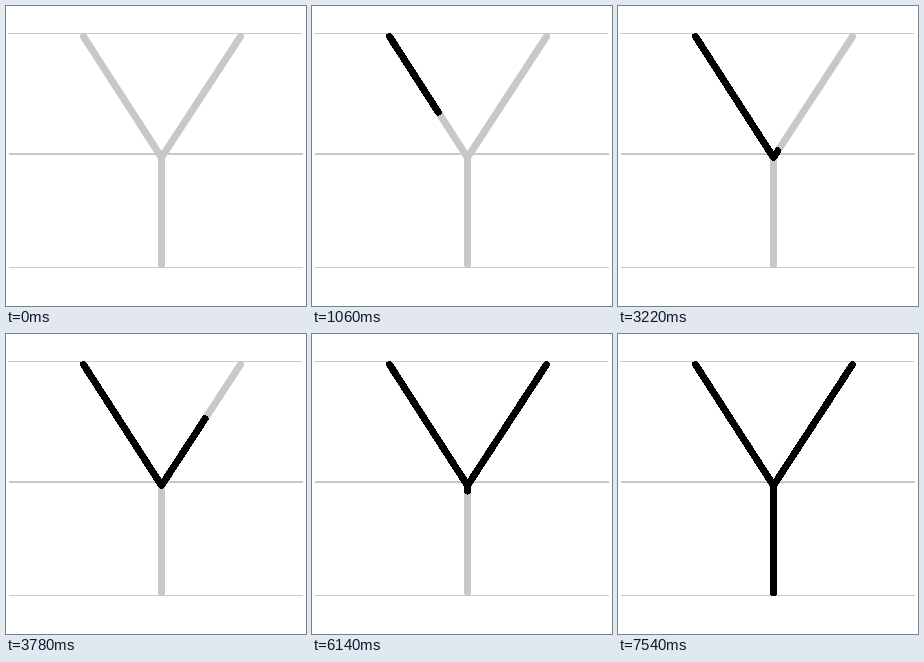
These frames come from a looping animation (300x300 px, 8000 ms). An HTML page:

```html
<!DOCTYPE html>
<html lang="en">
<head>
<meta charset="utf-8">
<title>Writing the letter Y</title>
<style>
  html, body { margin: 0; width: 100%; height: 100%; overflow: hidden; background: #fff; }
  svg { display: block; }
  rect { fill: #c8c8c8; }
  line { stroke: #c8c8c8; stroke-width: 7; stroke-linecap: round; }
  .ink { stroke: #000; shape-rendering: crispEdges; }
</style>
</head>
<body>
<svg width="300" height="300">
  <rect x="2" y="27" width="294" height="1"/>
  <rect x="3" y="147" width="294" height="2"/>
  <rect x="3" y="261" width="294" height="1"/>
</svg>
<script>
const svg = document.querySelector('svg');
const LOOP = 8000, STEP = 140;
const joint = [155.5, 151.5];

// gain shapes the start of the pen's easing, settle its end
const strokes = [
  { start: 500, steps: 9, gain: 1.25, settle: 1.5, from: [77.5, 30.5], to: joint },
  { start: 3220, steps: 9, gain: 1.5, settle: 1.5, from: joint, to: [234.5, 30.5] },
  { start: 6140, steps: 11, gain: 1.55, settle: 2.2, from: joint, to: [155.5, 258.5] },
];

function addLine({ from, to }, className) {
  const line = document.createElementNS(svg.namespaceURI, 'line');
  line.setAttribute('class', className);
  line.setAttribute('x1', from[0]);
  line.setAttribute('y1', from[1]);
  setEnd(line, to);
  svg.append(line);
  return line;
}

function setEnd(line, [x, y]) {
  line.setAttribute('x2', x);
  line.setAttribute('y2', y);
}

function draw(time) {
  for (const { start, steps, gain, settle, from, to, ink } of strokes) {
    const step = Math.floor((time - start) / STEP) + 1;
    const u = Math.min(Math.max(step / steps, 0), 1);
    const part = 1 - (1 - u ** gain) ** settle;
    ink.style.visibility = step > 0 ? 'visible' : 'hidden';
    setEnd(ink, from.map((v, i) => v + (to[i] - v) * part));
  }
}

function tick() {
  draw(performance.now() % LOOP);
  requestAnimationFrame(tick);
}

strokes.forEach(stroke => addLine(stroke, 'guide'));
strokes.forEach(stroke => stroke.ink = addLine(stroke, 'ink'));
tick();
</script>
</body>
</html>
```
